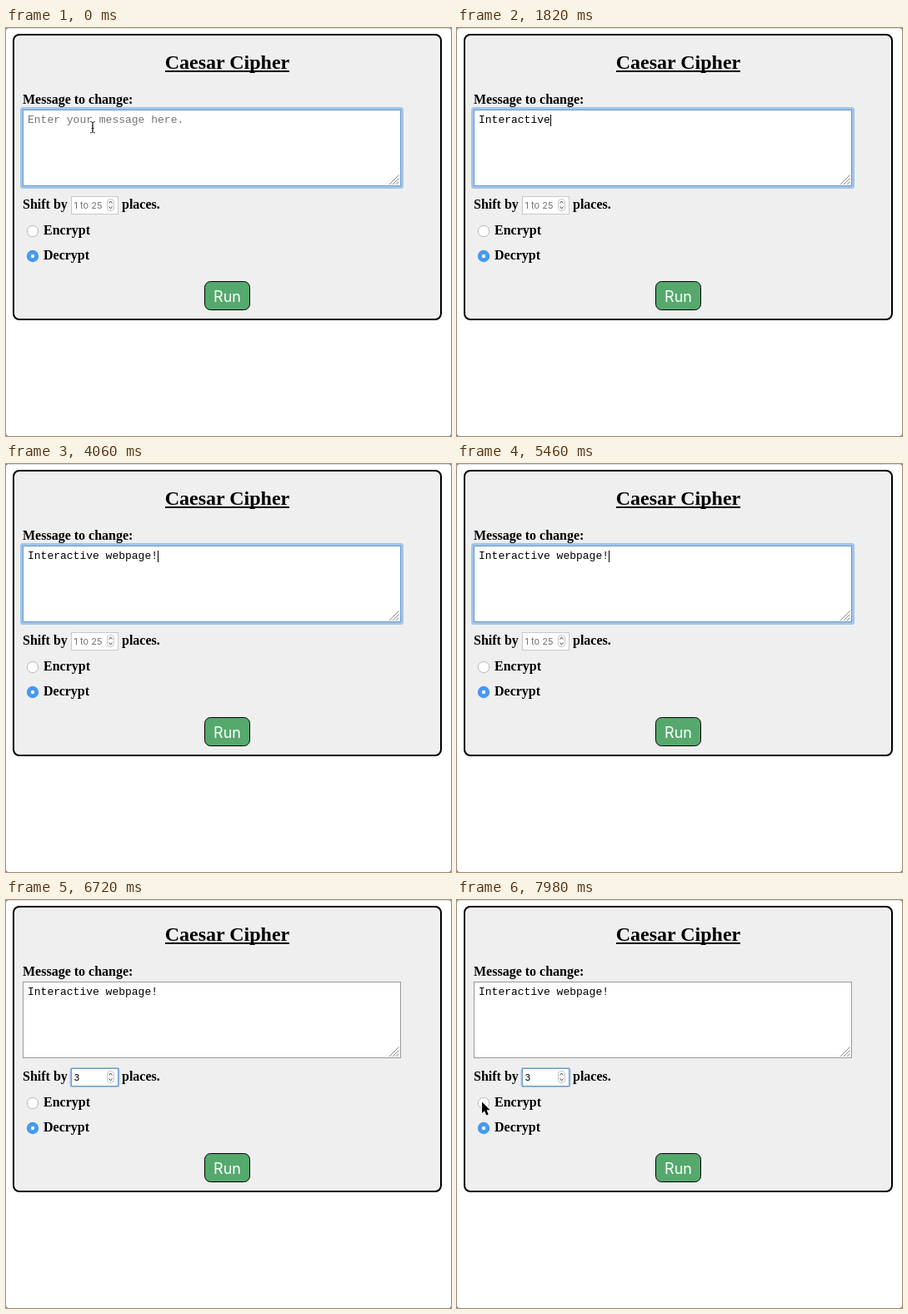
Recreate the animation shown at these times as an HTML page. Size 534 px wide and 490 px high, loop 8000 ms.

```html
<!DOCTYPE html>
<html lang="en">
<head>
<meta charset="utf-8">
<title>Caesar Cipher</title>
<style>
  html, body { margin: 0; width: 100%; height: 100%; overflow: hidden; background: #fff; }
  svg { display: block; width: 534px; height: 490px; }
  text { white-space: pre; }
  .serif { font: bold 16px "Liberation Serif", serif; }
  .title { font-size: 24px; text-anchor: middle; }
  .mono { font: 13px "Liberation Mono", monospace; }
  .ui { font: 11px Inter, sans-serif; }
  .run { font-size: 18px; text-anchor: middle; fill: #fff; }
  .hint { fill: #757575; }
  .line { fill: none; stroke: #888; }
  .ring { fill: none; stroke: #9fc5ec; stroke-width: 3; }
</style>
</head>
<body>
<svg viewBox="0 0 534 490">
  <path d="M0 .5H534" stroke="#dcdcdc"/>
  <path d="M0 0h2L0 2zM534 0h-2l2 2zM0 490h2l-2-2zM534 490h-2l2-2z" fill="#777"/>
  <rect x="9" y="8" width="513" height="342" rx="7" fill="#efefef" stroke="#000" stroke-width="2"/>

  <text class="serif title" x="265.5" y="49">Caesar Cipher</text>
  <path d="M191 52H340" stroke="#000" stroke-width="2"/>
  <text class="serif" x="20" y="91">Message to change:</text>

  <rect id="areaRing" class="ring" x="18.5" y="96.5" width="457" height="95" rx="2"/>
  <rect id="area" x="20.5" y="98.5" width="453" height="91" fill="#fff"/>
  <path class="line" d="M460 188L471.500 176.500M464 188L471.500 180.500M468 188L471.500 184.500"/>
  <text id="message" class="mono" x="26" y="114"></text>

  <text class="serif" x="20" y="217">Shift by</text>
  <rect id="shiftRing" class="ring" x="78" y="202.500" width="57" height="21" rx="2"/>
  <rect id="shiftBox" x="78.500" y="202.500" width="56" height="21" fill="#fff"/>
  <text id="shift" class="ui" x="81.500" y="217"></text>
  <rect x="121.500" y="205.500" width="8" height="14" rx="3.500" fill="#fff" stroke="#c4c4c4"/>
  <path d="M123.500 210.500l2-2.500 2 2.500M123.500 214.500l2 2.500 2-2.500" fill="none" stroke="#444"/>
  <text class="serif" x="139" y="217">places.</text>

  <circle cx="32" cy="244" r="6.700" fill="#fff" stroke="#b8b8b8"/>
  <text class="serif" x="45" y="248">Encrypt</text>
  <circle cx="32" cy="274" r="7.200" fill="#4799f0"/>
  <circle cx="32" cy="274" r="2.200" fill="#fff"/>
  <text class="serif" x="45" y="278">Decrypt</text>

  <rect x="238.500" y="304.500" width="54" height="34" rx="7" fill="#55a96c" stroke="#000"/>
  <text class="ui run" x="265.500" y="329">Run</text>

  <rect id="caret" width="1" height="14"/>
  <path id="beam" d="M101 112.500q3 0 3 2V124q0 2-3 2M107 112.500q-3 0-3 2V124q0 2 3 2M102.500 120.500h3" fill="none" stroke="#333"/>
  <path id="arrow" d="M0 0V13.500L3 10.800L5.200 16L7.800 14.900L5.600 9.800H9.700Z" stroke="#fff" stroke-width="1.200" paint-order="stroke"/>
</svg>
<script>
const LOOP = 8000;
const MESSAGE = "Interactive webpage!";
const KEY_TIMES = [140, 420, 840, 910, 980, 1120, 1260, 1470, 1540, 1680, 1820,
                   2170, 2450, 2590, 2800, 3150, 3290, 3500, 3710, 4060];
const TAB = 5530, DIGIT = 6160;
// Spans in which the blinking caret is hidden
const CARET_OFF = [[0, 140], [840, 1120], [4600, 5180], [5950, DIGIT], [6690, 7140], [7630, LOOP]];

const $ = id => document.getElementById(id);
const show = (id, on) => $(id).setAttribute("visibility", on ? "visible" : "hidden");
const set = (id, attrs) => {
  for (const name in attrs) $(id).setAttribute(name, attrs[name]);
};

function fill(id, value, hint) {
  $(id).textContent = value || hint;
  $(id).classList.toggle("hint", !value);
}

function draw(t) {
  const typed = KEY_TIMES.filter(k => k <= t).length;
  const inShift = t >= TAB;
  const hasDigit = t >= DIGIT;

  fill("message", MESSAGE.slice(0, typed), "Enter your message here.");
  fill("shift", hasDigit ? "3" : "", "1 to 25");

  show("areaRing", !inShift);
  show("shiftRing", inShift);
  set("area", { stroke: inShift ? "#999" : "#6c98c4" });
  set("shiftBox", { stroke: inShift ? "#6c98c4" : "#c8c8c8" });

  show("caret", !CARET_OFF.some(([a, b]) => t >= a && t < b));
  set("caret", inShift
    ? { x: hasDigit ? 89 : 82, y: 206 }
    : { x: 26 + Math.round(typed * 7.8), y: 104 });

  show("beam", t < KEY_TIMES[0]);

  // The pointer comes in from the left edge and settles on the radio button
  show("arrow", t >= 7000);
  const enter = Math.min(1, Math.max(0, (t - 7000) / 140));
  const p = Math.min(1, Math.max(0, (t - 7280) / 630));
  const ease = p * p * (3 - 2 * p);
  set("arrow", { transform: `translate(${-8 + 10 * enter + 28 * ease} ${228 + 14.500 * ease})` });
}

function tick(now) {
  draw(now % LOOP);
  requestAnimationFrame(tick);
}
draw(0);
requestAnimationFrame(tick);
</script>
</body>
</html>
```
